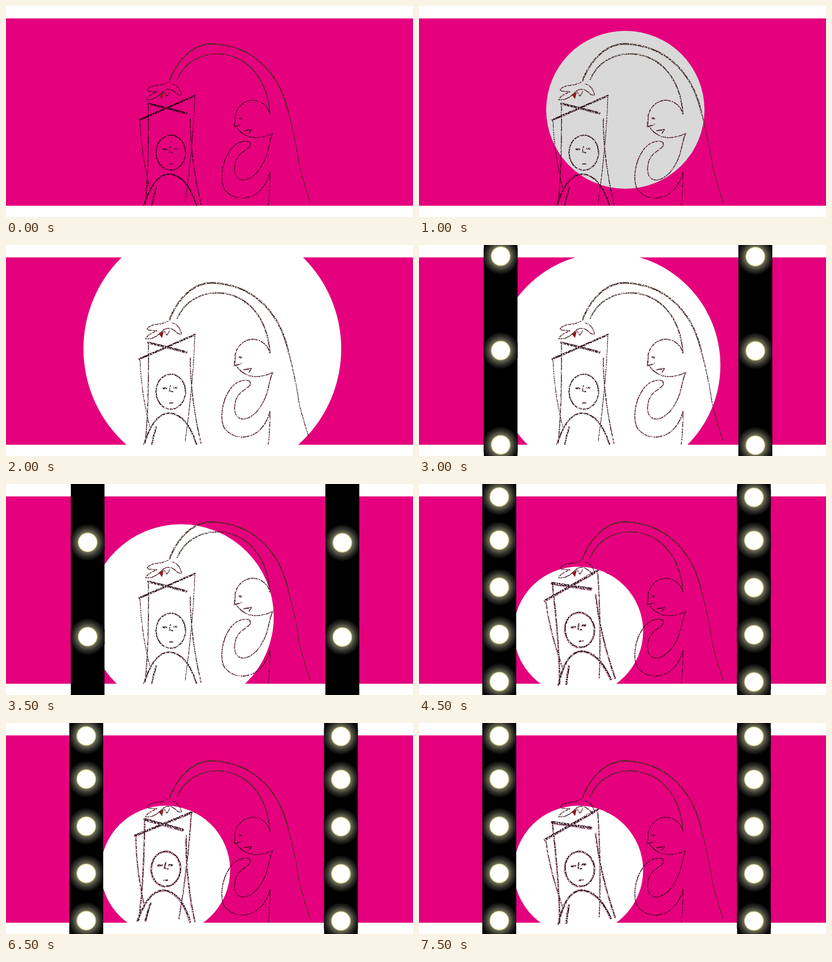
An HTML page that plays this animation: 720 px wide and 374 px high, repeating every 8 s.

```html
<!DOCTYPE html>
<html lang="en">
<head>
<meta charset="utf-8">
<title>Puppeteer in the spotlight</title>
<style>
  html, body { margin: 0; width: 100%; height: 100%; overflow: hidden; background: #fff; }
  svg { display: block; width: 720px; height: 374px; }
  .ink path { fill: none; stroke-linecap: round; stroke-linejoin: round; }
  .ink .nail { fill: #8c1c22; }
</style>
</head>
<body>
<svg viewBox="0 0 720 374">
  <defs>
    <filter id="chalk" filterUnits="userSpaceOnUse" x="0" y="0" width="720" height="374" color-interpolation-filters="sRGB">
      <feTurbulence type="fractalNoise" baseFrequency=".5" numOctaves="2" seed="4"/>
      <feColorMatrix values="1 0 0 0 0  0 1 0 0 0  0 0 1 0 0  0 0 0 0 1" result="noise"/>
      <feDisplacementMap in="SourceGraphic" in2="noise" scale="1.8" xChannelSelector="R" yChannelSelector="G" result="rough"/>
      <feColorMatrix in="noise" values="0 0 0 0 0  0 0 0 0 0  0 0 0 0 0  0 0 5 0 -1.7" result="grain"/>
      <feComposite in="rough" in2="grain" operator="in"/>
    </filter>
    <radialGradient id="glow">
      <stop offset=".44" stop-color="#fff"/>
      <stop offset=".49" stop-color="#f1f0b4"/>
      <stop offset=".54" stop-color="#6c6b55"/>
      <stop offset=".75" stop-color="#32322c"/>
      <stop offset="1" stop-color="#000"/>
    </radialGradient>
    <clipPath id="spot"><circle class="disc"/></clipPath>
  </defs>
  <rect width="720" height="374" fill="#fff"/>
  <rect y="22" width="720" height="332" fill="#e5007d"/>
  <g id="dark" class="ink"></g>
  <circle id="light" class="disc"/>
  <g clip-path="url(#spot)">
    <g id="bright" class="ink"></g>
    <g id="still" class="ink"></g>
    <g id="swing" class="ink"></g>
  </g>
  <g id="strips"></g>
</svg>
<script>
const $ = id => document.getElementById(id);

// Strokes as [width, path].
const arms = [
  [2.4, 'M289 133C305 92 333 67 365 67C430 70 482 110 500 190'],
  [1.4, 'M500 190Q513 240 519 283Q528 318 538 347'],
  [2, 'M303 130C318 96 350 83 380 85C430 90 462 130 467 191']
];
const hand = [
  [1.5, 'M287 135Q275 141 262 141Q244 148 253 151L267 152Q250 159 247 166Q262 169 278 151Q290 142 304 157Q314 161 308 150Q303 140 294 138'],
  [1.4, 'M280 153L285 160L290 151']
];
const figure = [
  [1.5, 'M467 191A32 35 0 0 0 406 192M408 215Q430 245 472 226'],
  [1.9, 'M406 192L404 214L417 210M421 221L434 219L430 225'],
  [3.2, 'M413 199h3'],
  [1.5, 'M472 226C462 245 468 265 444 295C420 320 398 308 406 277C412 254 438 255 431 241Q415 236 400 251C378 278 378 318 389 328C412 352 455 342 467 295Q467 325 464 353']
];
const puppet = [
  [3.4, 'M236 202L334 159'],
  [4, 'M252 173L319 190'],
  [1.7, 'M252 173Q253 290 246 352M326 200Q326 270 345 352'],
  [1.3, 'M237 204Q239 260 254 322M334 160Q331 250 317 348'],
  [2.2, 'M291 229a26 31 0 1 0 1 0'],
  [2.8, 'M278 254h6M297 253h5'],
  [1.8, 'M291 249L289 259L295 260M289 280h6'],
  [2.6, 'M244 353Q262 298 289 298Q320 300 337 353M258 353Q261 337 266 322']
];

const draw = (parts, color, scale = 1) => parts.map(([w, d]) =>
  `<path d="${d}" stroke="${color}" stroke-width="${w * scale}"/>`).join('');
const chalk = inner => `<g filter="url(#chalk)">${inner}</g>`;
const nail = '<path class="nail" d="M270 157L279 153L276 165Z"/>';

$('dark').innerHTML = chalk(draw(arms, '#40301a') + draw(hand, '#4a0a24') +
  draw(figure, '#24000f', .9) + draw(puppet, '#1c000c', .9)) + nail;
$('bright').innerHTML = chalk(draw(arms, '#3c2620', 1.15) + draw(hand, '#4a1a20', 1.1) +
  draw(figure, '#42101f', 1.15)) + nail;
$('still').innerHTML = chalk(draw(puppet, '#2c0c18'));
$('swing').innerHTML = chalk(
  `<g id="pose"><g transform="translate(-1 .8)" opacity=".6">${draw(puppet, '#b03a70', 1.3)}</g>${
    draw(puppet, '#2c0616', 1.15)}</g>`);

const LAMPS = [0, 1, 2, 3, 4];
const strip = `<svg class="strip" width="60" height="374"><rect width="60" height="374"/>${
  LAMPS.map(() => '<circle class="lamp" cx="30" r="33" fill="url(#glow)"/>').join('')}</svg>`;
$('strips').innerHTML = strip + strip;
const discs = document.querySelectorAll('.disc');
const strips = document.querySelectorAll('.strip');

const STEP = 500, COUNT = 16;
const OPEN = 4, SHUT = 8, PARKED = 9;
const mix = (a, b, u) => a + (b - a) * u;

// The spotlight opens with a quadratic ease-out, then closes in on the puppet.
function spotlight(step) {
  const left = Math.max(0, OPEN - step) ** 2;
  const u = Math.min(1, Math.max(0, step - OPEN) / (SHUT - OPEN));
  const slide = u ** 1.4;
  return {
    cx: mix(365, 282, slide),
    cy: mix(184, 261, slide),
    r: step < 2 ? 0 : mix(228 - 22 * left, 114.5, u * u),
    fill: `hsl(0 0% ${100 - 3.75 * left}%)`
  };
}

// The film strips come in from both sides and settle.
function stripX(step, side) {
  const out = step < 5 ? 200 : step === 5 ? 100 : 0;
  const sway = step < PARKED ? 2.5 : 0;
  return 112 + 450.5 * side + sway + (side ? out : -out);
}

// Lamps blink in alternate sets, then all against the odd ones.
function lit(step, i) {
  const odd = i % 2 === 1;
  return step < PARKED ? odd === (step === 7) : odd || step % 2 === 1;
}

function lampY(step, i) {
  const parked = step >= PARKED;
  return Math.max(parked ? 23 : 0, (parked ? 183 : 187) + 83.6 * (i - 2));
}

function show(step) {
  const { fill, ...shape } = spotlight(step);
  discs.forEach(d => Object.entries(shape).forEach(([k, v]) => d.setAttribute(k, v)));
  $('light').setAttribute('fill', fill);

  const swinging = step >= SHUT, beat = step % 3;
  $('still').style.display = swinging ? 'none' : '';
  $('swing').style.display = swinging ? '' : 'none';
  $('pose').setAttribute('transform',
    `translate(${284 - 1.5 * beat} 258.5) rotate(${7.5 * beat - 6}) translate(-291 -260)`);

  strips.forEach((s, side) => {
    s.setAttribute('x', stripX(step, side));
    s.querySelectorAll('.lamp').forEach((lamp, i) => {
      lamp.style.display = lit(step, i) ? '' : 'none';
      lamp.setAttribute('cy', lampY(step, i) + side * .7);
    });
  });
}

const start = performance.now();
let shown = -1;
function tick(now) {
  const step = Math.floor(Math.max(0, now - start) / STEP) % COUNT;
  if (step !== shown) show(shown = step);
  requestAnimationFrame(tick);
}
tick(start);
</script>
</body>
</html>
```
